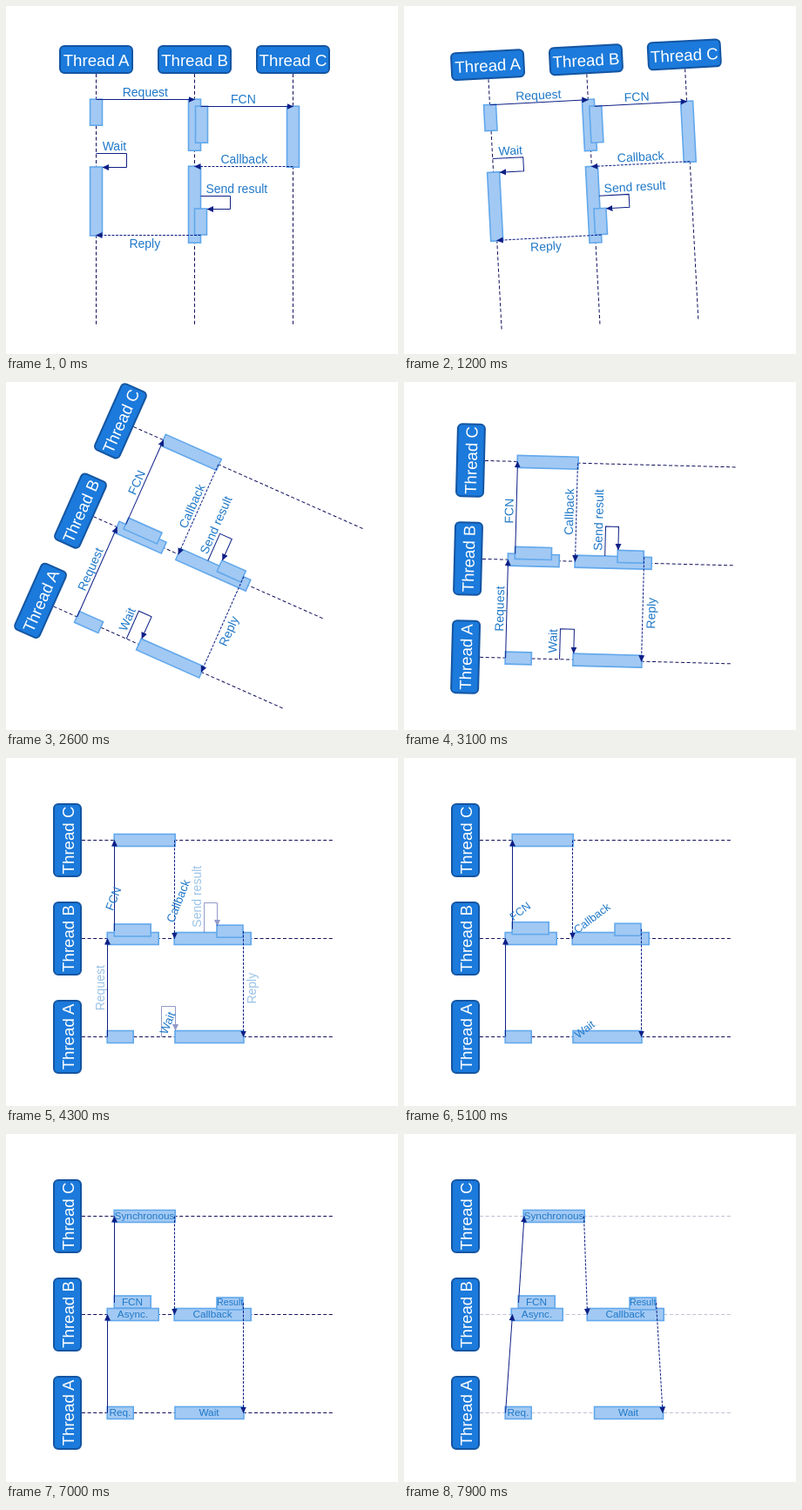
Write an HTML page that moves like this. It is 450 by 400 pixels and loops after 8 s.

```html
<!DOCTYPE html>
<html>
<head>
<meta charset="utf-8">
<style>
  html, body { margin: 0; width: 100%; height: 100%; overflow: hidden; background: #fff; }
  svg { display: block; width: 450px; height: 400px; font-family: "Liberation Sans", Arial, sans-serif; }
  text { text-anchor: middle; fill: #1f78c8; font-size: 14px; }
  .head rect { fill: #1b7adb; stroke: #1455a2; stroke-width: 2; }
  .head text { fill: #fff; font-size: 18.67px; }
  .bar { fill: #a2c9f3; stroke: #62a8ec; stroke-width: 1.6; }
  .life { stroke: #10105c; stroke-width: 1; stroke-dasharray: 4 2.6; }
  .arrow { fill: none; stroke: #0e1f86; stroke-width: 1; }
  .dash { stroke-dasharray: 3 1.5; }
</style>
</head>
<body>
<svg id="stage" viewBox="0 0 450 400">
  <defs>
    <marker id="tip" markerUnits="userSpaceOnUse" markerWidth="8" markerHeight="8" refX="7" refY="4" orient="auto">
      <path d="M0 0.5 L7.5 4 L0 7.5 Z" fill="#0e1f86"/>
    </marker>
  </defs>
  <g id="world">
    <g id="lives"></g>
    <g id="bars"></g>
    <g id="arrows"></g>
    <g id="fading"></g>
    <g id="heads"></g>
  </g>
  <g id="words"></g>
</svg>
<script>
const LOOP = 8000;
// The diagram turns about one point, then settles as if turned about another.
const TURN = [217.6, 205.6], REST = [216.5, 207.5], SETTLE = 3500;
const $ = id => document.getElementById(id);
const lerp = (a, b, p) => a + (b - a) * p;
const ramp = (t, start, length) => Math.min(1, Math.max(0, (t - start) / length));

function add(parent, tag, attrs, content) {
  const el = document.createElementNS("http://www.w3.org/2000/svg", tag);
  for (const k in attrs) el.setAttribute(k, attrs[k]);
  if (content) el.textContent = content;
  parent.appendChild(el);
  return el;
}
const label = (parent, s, x, y, more) => add(parent, "text", { x, y, dy: ".36em", ...more }, s);

// Headers and lifelines
[["A", 103.5], ["B", 216.5], ["C", 329.5]].forEach(([name, x]) => {
  add($("lives"), "line", { class: "life", x1: x, y1: 78, x2: x, y2: 368 });
  const g = add($("heads"), "g", { class: "head" });
  add(g, "rect", { x: x - 41.5, y: 46, width: 83, height: 31, rx: 5 });
  label(g, "Thread " + name, x, 62);
});

// Activation bars: x, y, length, sideways lift, late delay
const bars = [
  [96.5, 107.2, 30, 0, 0],
  [96.5, 185, 79, 0, 24.5],
  [209.5, 107.2, 59, 0, 7],
  [217.5, 115.2, 42, 6.5, 7],
  [322.5, 115.2, 70, 0, 13],
  [209.5, 184.2, 88, 0, 17],
  [216.5, 233, 30, 5.5, 17]
].map(([x, y, h, lift, delay]) => ({
  x, y, lift, delay,
  el: add($("bars"), "rect", { class: "bar", width: 14, height: h })
}));

// Messages: x1, x2, y, lift of the tail, delay at each end
const arrows = [
  [103.5, 216.5, 107.5, 0, 0, 8],
  [223.5, 329.5, 115.5, 6.5, 7, 13.5],
  [329.5, 216.5, 184.5, 0, 13, 17, 1],
  [223.5, 103.5, 263.5, 6.5, 17, 24.5, 1]
].map(([x1, x2, y, lift, d1, d2, dashed]) => ({
  x1, y, lift, d1, d2,
  el: add($("arrows"), "line", { class: "arrow" + (dashed ? " dash" : ""), x2, "marker-end": "url(#tip)" })
}));

// Parts that fade out
["M103.5 169.5H138.5V185.5H111", "M223.5 218.5H257.5V233.5H231"].forEach(d =>
  add($("fading"), "path", { class: "arrow", d, "marker-end": "url(#tip)" }));
[["Request", 159.8, 99], ["Send result", 264.8, 210], ["Reply", 159.3, 273]].forEach(
  ([s, x, y]) => label($("fading"), s, x, y));

// Labels that turn and travel into the bars
const movers = [
  ["FCN", 272.4, 107, 145, 193, 7],
  ["Callback", 273.3, 176, 237, 207, 17],
  ["Wait", 124.4, 161, 233, 320, 24.5]
].map(([s, x, y, tx, ty, delay]) => ({ x, y, tx, ty, delay, el: label($("words"), s, 0, 0) }));

// Labels that appear inside the bars
const fresh = [
  ["Synchronous", 159, 94, 13, 11.8],
  ["Async.", 145.5, 207, 7, 11.8],
  ["Req.", 131, 320, 0, 11.8],
  ["Result", 257.2, 192.7, 17, 10.7]
].map(([s, x, y, delay, size]) => ({
  x, delay, el: label($("words"), s, x, y, { style: "font-size:" + size + "px" })
}));

function draw(t) {
  const spin = -90 * ramp(t, 1134, 2000);
  const move = ramp(t, 3750, 2290);
  const fade = 1 - ramp(t, 3750, 1000);
  const appear = ramp(t, 5150, 1000);
  const late = Math.max(0, (t - 7220) / 680);
  const rad = spin * Math.PI / 180, cos = Math.cos(rad), sin = Math.sin(rad);
  const [cx, cy] = t < SETTLE ? TURN : REST;

  $("world").setAttribute("transform", `rotate(${spin} ${cx} ${cy})`);
  $("fading").setAttribute("opacity", fade);
  $("lives").setAttribute("opacity", 1 - 0.74 * Math.min(1, late));

  for (const b of bars) {
    b.el.setAttribute("x", b.x + b.lift * move);
    b.el.setAttribute("y", b.y + b.delay * late);
  }
  for (const a of arrows) {
    a.el.setAttribute("x1", a.x1 + a.lift * move);
    a.el.setAttribute("y1", a.y + a.d1 * late);
    a.el.setAttribute("y2", a.y + a.d2 * late);
  }
  for (const m of movers) {
    const dx = m.x - cx, dy = m.y - cy;
    const x = lerp(cx + dx * cos - dy * sin, m.tx, move) + m.delay * late;
    const y = lerp(cy + dx * sin + dy * cos, m.ty, move);
    m.el.setAttribute("transform", `translate(${x} ${y}) rotate(${spin + 90 * move})`);
    m.el.style.fontSize = lerp(14, 11.8, move) + "px";
  }
  for (const f of fresh) {
    f.el.setAttribute("x", f.x + f.delay * late);
    f.el.setAttribute("opacity", appear);
  }
}

const begin = performance.now();
function tick() {
  draw((performance.now() - begin) % LOOP);
  requestAnimationFrame(tick);
}
draw(0);
requestAnimationFrame(tick);
</script>
</body>
</html>
```
